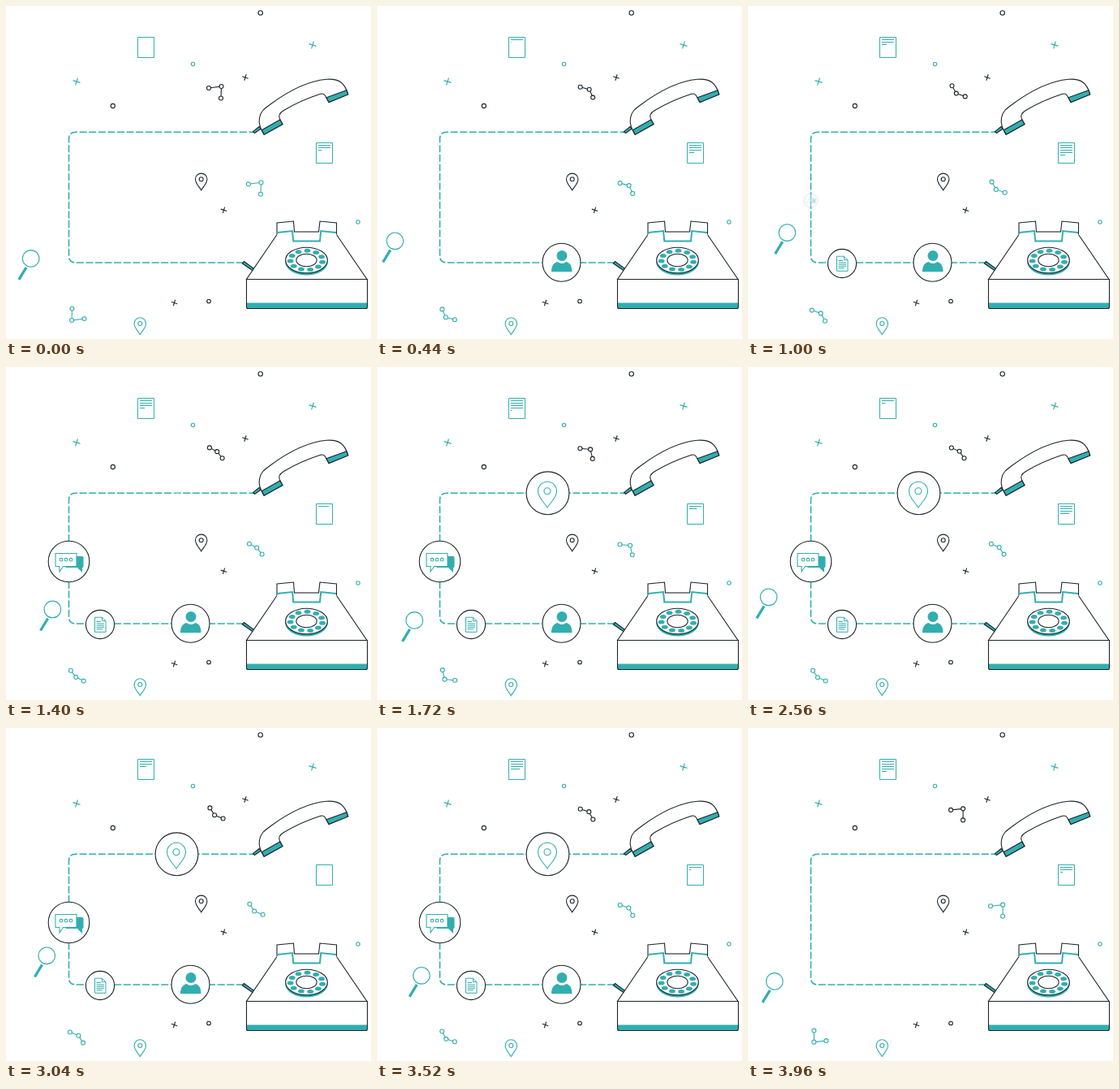
An HTML page with a canvas for the animation above (4000 ms loop, 450 by 410 pixels).

```html
<!DOCTYPE html>
<html lang="en">
<head>
<meta charset="utf-8">
<title>Telephone line</title>
<style>
  html, body { margin: 0; width: 100%; height: 100%; overflow: hidden; background: #fff; }
  canvas { display: block; width: 450px; height: 410px; }
</style>
</head>
<body>
<canvas id="stage" width="450" height="410"></canvas>
<script>
const ctx = document.getElementById('stage').getContext('2d');
const TEAL = '#32aeb0', DARK = '#1b262c', WHITE = '#fff';
const LOOP = 4000, HALF = 2000, STEP = 40;

const clamp = v => Math.max(0, Math.min(1, v));
const mix = (a, b, k) => a + (b - a) * k;

function paint(path, stroke, fill, width = 1.1) {
  if (fill) { ctx.fillStyle = fill; ctx.fill(path); }
  if (stroke) { ctx.strokeStyle = stroke; ctx.lineWidth = width; ctx.stroke(path); }
}
const draw = (d, stroke, fill, width) => paint(new Path2D(d), stroke, fill, width);

function oval(x, y, rx, ry, stroke, fill, width) {
  const p = new Path2D();
  p.ellipse(x, y, rx, ry, 0, 0, Math.PI * 2);
  paint(p, stroke, fill, width);
}
const ring = (x, y, r, stroke, fill, width) => oval(x, y, r, r, stroke, fill, width);

function cross(x, y, r, color) {
  const a = 0.3, c = r * Math.cos(a), s = r * Math.sin(a);
  draw(`M${x - c} ${y - s}L${x + c} ${y + s}M${x + s} ${y - c}L${x - s} ${y + c}`, color);
}

// Map pin with a round head of radius r and its tip h below the head centre
function pin(x, y, r, h, hole, color) {
  draw(`M${x} ${y + h}C${x - r * 0.3} ${y + h * 0.7} ${x - r} ${y + r * 0.75} ${x - r} ${y}
    A${r} ${r} 0 0 1 ${x + r} ${y}
    C${x + r} ${y + r * 0.75} ${x + r * 0.3} ${y + h * 0.7} ${x} ${y + h}Z`, color, WHITE);
  ring(x, y, hole, color, WHITE);
}

// Three linked nodes whose middle joint folds back and forth
function chain(k, color, place) {
  const nodes = [
    [mix(250, 251.5, k), mix(101, 98.3, k)],
    [mix(265.5, 256.8, k), mix(99, 107.6, k)],
    [mix(265, 267.7, k), mix(113.5, 111.4, k)]
  ].map(place);
  draw('M' + nodes.map(n => n.join(' ')).join('L'), color);
  nodes.forEach(([x, y]) => ring(x, y, 2.5, color, WHITE));
}

// Sheet that fills with five lines, one every 400 ms
function sheet(x, y, t) {
  draw(`M${x} ${y}h20v25h-20Z`, TEAL, WHITE, 1);
  const phase = (t % HALF) / 400;
  for (let i = 0; i < 5; i++) {
    const part = Math.pow(clamp(phase - i), 1.3);
    if (part) draw(`M${x + 2.5} ${y + 3 + i * 3}h${part * (i < 4 ? 15 : 7)}`, TEAL, null, 1);
  }
}

function magnifier(t) {
  const a = (119 + 0.18 * t) * Math.PI / 180;
  const x = 39.5 + 18.2 * Math.cos(a), y = 295 + 18.2 * Math.sin(a);
  draw(`M${x - 5.7} ${y + 11}L${x - 14.8} ${y + 26}`, TEAL, null, 3.2);
  ring(x, y, 10.3, TEAL, WHITE);
}

function cord() {
  ctx.setLineDash([9, 2.6]);
  draw('M293 316H86Q77.5 316 77.5 307.5V163.5Q77.5 155.3 86 155.3H306', TEAL, null, 1.6);
  ctx.setLineDash([]);
  draw('M293.5 314.5L305.5 323.3L304 325.8L291.3 316.8Z', DARK, TEAL);
  draw('M304.5 154.7L312 148.5L314.5 151L306.5 156.5Z', DARK, TEAL);
}

function handset() {
  draw(`M318 158.3C314 151 311 145 312.5 138C314 129 319 126 326 121
    C345 107 371 92.5 395 90.3C412 89 418 96 421.7 108.7L398 118.5L394.5 112
    C392.5 107.8 390.5 107.3 387 108.5C370 114 355 121 342.5 128.5
    C336.5 132 335.5 135 337.5 139L341 145.5Z`, DARK, WHITE);
  draw('M315.3 152.7L337.8 140L341 145.5L318.3 158.3Z', DARK, TEAL);
  draw('M395 112.8L420 103.8L421.7 109L398 118.5Z', DARK, TEAL);
}

function dial() {
  const x = 370.5, y = 313;
  oval(x, y + 2, 25.8, 16, TEAL, TEAL);
  oval(x, y, 25.8, 15.8, DARK, WHITE);
  for (let i = 0; i < 11; i++) {
    const a = -1.52 + i * Math.PI * 2 / 11;
    oval(x + 20 * Math.cos(a), y + 11.7 * Math.sin(a), 3.9, 2.5, null, TEAL);
  }
  oval(x, y, 12.6, 7.7, DARK, WHITE);
}

function phone() {
  draw('M334 281.5L296.5 336.5H445L407.5 281.5', DARK, WHITE);
  draw('M355 278H386', DARK);
  draw('M334 281V267L354.5 265L355.5 278', DARK, WHITE);
  draw('M407.5 281V267L387 265L385.5 278', DARK, WHITE);
  draw('M334 279L353 277L354.3 289.5H387L388.2 277L407 279', TEAL, null, 2);
  draw('M296.5 336.5H445.5V370.5Q445.5 372.5 443.5 372.5H298.5Q296.5 372.5 296.5 370.5Z', null, WHITE);
  draw('M297 365.5H445V372H297Z', null, TEAL);
  draw('M296.5 336.5H445.5V370.5Q445.5 372.5 443.5 372.5H298.5Q296.5 372.5 296.5 370.5Z', DARK);
  dial();
}

function person() {
  ring(0.5, -8.3, 6.5, null, TEAL);
  draw('M-12.5 11.5C-12.5 4 -9.5 0.5 -5 -0.8Q0.5 3 6 -0.8C10.5 0.5 13 4 13 11.5Z', null, TEAL);
}

function paper() {
  draw('M-6.5 -8.8H2.5L7 -4.3V9.3H-6.5ZM2.5 -8.8V-4.3H7', TEAL, WHITE, 1);
  draw('M-4.5 -3.5H1M-4.5 -1H5M-4.5 1.2H5M-4.5 3.4H5M-4.5 5.6H3', TEAL, null, 1);
}

function chat() {
  draw('M-4 -6.5H16.5Q18 -6.5 18 -5V6Q18 7.5 16.5 7.5V13.5L10.5 7.5H-4Z', null, TEAL);
  draw('M-16.5 -10H9.5V6H-7L-11.5 12.5V6H-16.5Z', TEAL, WHITE);
  [-9.5, -3.5, 2.5].forEach(x => ring(x, -2.3, 1.8, TEAL, WHITE));
}

const badges = [
  { x: 227.5, y: 315.8, r: 23.5, at: 0, icon: person },
  { x: 116, y: 317, r: 17.6, at: 450, icon: paper },
  { x: 77.5, y: 239.5, r: 25.3, at: 900, icon: chat },
  { x: 210.5, y: 155.3, r: 26.4, at: 1350, icon: () => pin(-0.5, -2.5, 11.5, 20.3, 4, TEAL) }
];

function badge({ x, y, r, at, icon }, t) {
  const k = Math.min(clamp((t - at) / 300), clamp((3900 - t) / 300));
  if (!k) return;
  ctx.save();
  ctx.globalAlpha = k;
  ctx.translate(x, y);
  ctx.scale(k, k);
  ring(0, 0, r, DARK, WHITE);
  icon();
  ctx.restore();
}

function scatter() {
  [[295, 88], [268.5, 251.3], [207.5, 365.5]].forEach(([x, y]) => cross(x, y, 3.9, DARK));
  [[378, 48], [87, 93]].forEach(([x, y]) => cross(x, y, 4.7, TEAL));
  [[313.7, 8.5, 2.7], [131.8, 123, 2.6], [250, 363.5, 2.3]].forEach(d => ring(...d, DARK, WHITE));
  [[230.5, 71.5, 2.2], [434, 266, 2.2]].forEach(d => ring(...d, TEAL, WHITE));
  pin(240.7, 213.3, 7.2, 13.5, 2.5, DARK);
  pin(165.3, 391, 7.2, 13.5, 2.5, TEAL);
}

function render(t) {
  ctx.fillStyle = WHITE;
  ctx.fillRect(0, 0, 450, 410);
  scatter();
  const fold = 1 - Math.abs((t % HALF) / 1000 - 1);
  chain(fold, DARK, p => p);
  chain(fold, TEAL, ([x, y]) => [x + 49, y + 118.3]);
  chain(fold, TEAL, ([x, y]) => [346.5 - x, 486 - y]);
  sheet(162.5, 38.5, t);
  sheet(382.5, 168.5, t + 960);
  magnifier(t);
  cord();
  handset();
  phone();
  badges.forEach(b => badge(b, t));
}

const start = performance.now();
function tick() {
  const t = (performance.now() - start) % LOOP;
  render(Math.floor(t / STEP) * STEP);
  requestAnimationFrame(tick);
}
tick();
</script>
</body>
</html>
```
